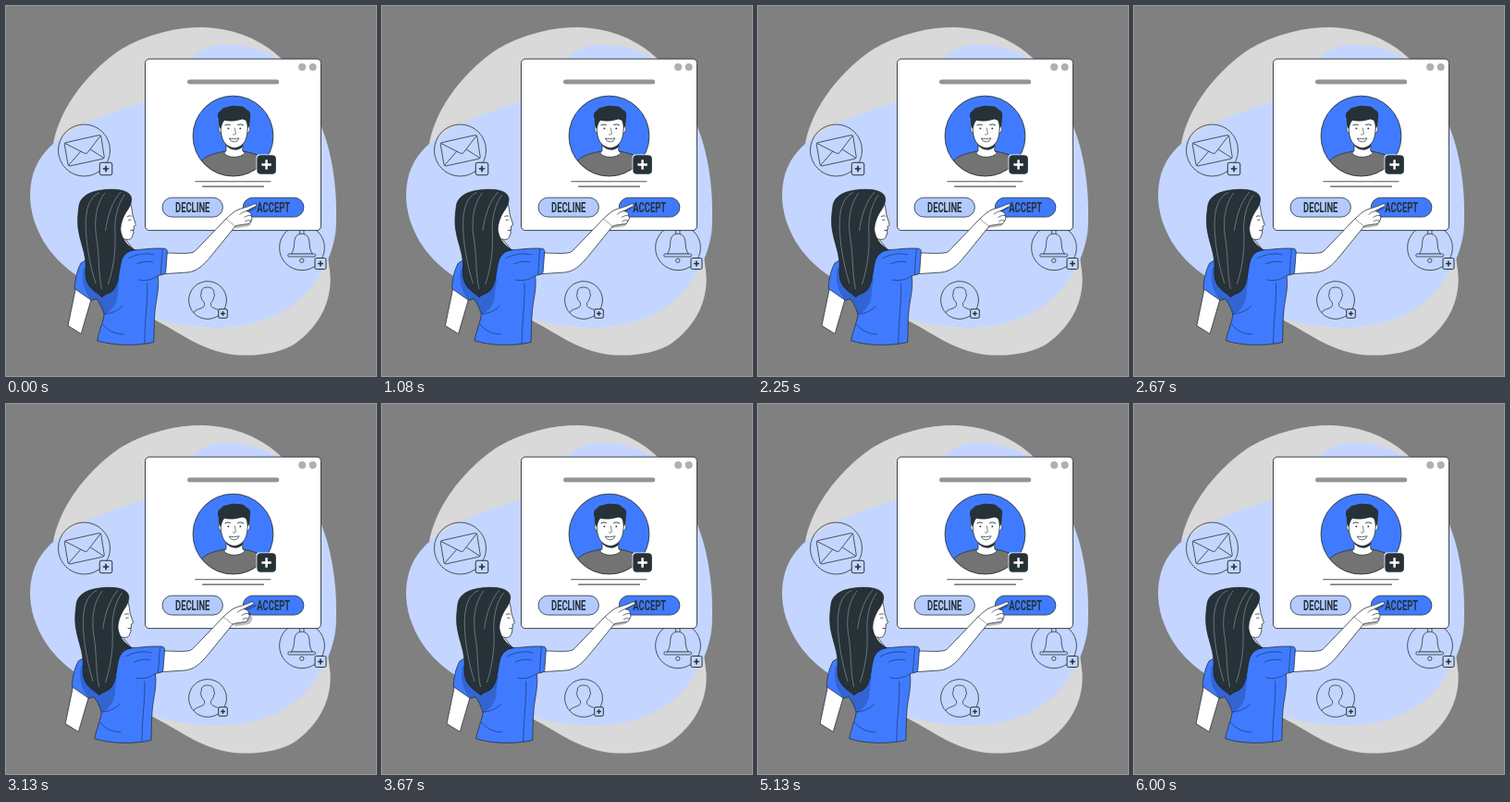
Write an HTML page with a canvas that moves like this. It is 400x400 px and loops after 6040 ms.

```html
<!DOCTYPE html>
<html lang="en">
<head>
<meta charset="utf-8">
<title>Friend request</title>
<style>
html, body { margin: 0; width: 100%; height: 100%; overflow: hidden; background: #808080; }
canvas { display: block; width: 400px; height: 400px; }
</style>
</head>
<body>
<canvas id="stage"></canvas>
<script>
const LOOP = 6040, STEPS = 145, SWING = 3.3;
const INK = '#263238', BLUE = '#407bff', PALE = '#c4d6ff', SHADE = '#3264d2';

const canvas = document.getElementById('stage');
const ctx = canvas.getContext('2d');
const dpr = window.devicePixelRatio || 1;
canvas.width = canvas.height = 400 * dpr;

function paint(path, fill, stroke, width = 0.8) {
  if (fill) { ctx.fillStyle = fill; ctx.fill(path); }
  if (stroke) { ctx.strokeStyle = stroke; ctx.lineWidth = width; ctx.stroke(path); }
}

function draw(d, fill, stroke, width) {
  paint(new Path2D(d), fill, stroke, width);
}

function circle(x, y, r, fill, stroke, width) {
  const p = new Path2D();
  p.arc(x, y, r, 0, Math.PI * 2);
  paint(p, fill, stroke, width);
  return p;
}

function box(x, y, w, h, r, fill, stroke, width) {
  const p = new Path2D();
  p.roundRect(x, y, w, h, r);
  paint(p, fill, stroke, width);
}

function badge(cx, cy, size, arm, fill, ink, weight) {
  box(cx - size / 2, cy - size / 2, size, size, size * 0.14, fill, INK, 1);
  draw(`M${cx - arm} ${cy}H${cx + arm}M${cx} ${cy - arm}V${cy + arm}`, null, ink, weight);
}

function label(text, x, y) {
  ctx.save();
  ctx.translate(x, y);
  ctx.scale(0.61, 1); // condensed face for all button labels
  ctx.font = '700 15.4px Roboto, "Liberation Sans", sans-serif';
  ctx.textAlign = 'center';
  ctx.fillStyle = INK;
  ctx.fillText(text, 0, 0);
  ctx.restore();
}

function background() {
  ctx.fillStyle = '#808080';
  ctx.fillRect(0, 0, 400, 400);
  draw('M50.5 152C56 116 82 76 124 47C153 30 184 23 212 23C248 24 277 37 299 58C322 80 330 120 334 170C338 215 347 258 350 286C354 316 340 345 314 364C297 376 270 379 246 377C213 373 189 354 164 341L90 300Z', '#d9d9d9');
  draw('M202 56C211 46 225 41 242 42C264 43 282 50 298 59C318 79 334 106 343 136C353 162 358 200 357 230C357 242 356 250 353 260C346 286 327 313 302 329C276 345 236 351 202 346C161 341 120 327 90 300C64 285 44 266 33.5 240C25 220 24 199 29.5 181C34 167 42 157 51 149C76 127 116 114 152 103C174 94 187 72 202 56Z', PALE);
}

function mail() {
  circle(84.5, 156, 28, null, INK);
  draw('M64.5 147.7L100.5 139.6Q102.4 139.2 102.8 141L106.2 162.8Q106.5 164.8 104.6 165.2L69.2 172.9Q67.4 173.2 67 171.3L63.3 149.8Q63 148 64.5 147.7Z', null, INK);
  draw('M63.6 148.4L85 159.3Q87 160 88.2 158.4L102.2 140.2M67.6 172.2L80.8 157.2M105.7 164.4L91.2 154.9', null, INK);
  badge(108, 176, 13.5, 3.2, PALE, INK, 1.7);
}

function user() {
  circle(218, 318, 20.4, null, INK);
  draw('M202.8 331.6C204.4 327.6 212.2 327.4 214.1 324.6C214.8 323.2 214.6 321.5 214.1 320.2C211.6 318.4 211 315.7 211 314.2C209.8 312.8 210.4 311.4 211.2 311.2C210.6 306.2 213.5 304 217.8 304C222.4 304 225.4 306.7 224.8 311.3C226.1 311.9 225.6 314.1 224.7 314.6C224.5 317.3 223.4 319.2 221.8 320.3C221.4 322 221.4 323.4 222 324.6C223.8 327.4 231.6 327.7 233.2 331.6', null, INK);
  badge(234.5, 332.5, 9.6, 2.4, PALE, INK, 1.4);
}

function bell() {
  circle(320, 261.3, 24.4, null, INK);
  draw('M308.2 268.2C311.4 264 311.4 259 311.7 255.5C312.2 248.8 315 246.4 319.7 246.2C324.4 246.4 327.6 249 328 255.5C328.2 260 328.6 264.5 331.4 268.2Z', null, INK);
  box(304.7, 268, 30, 3, 1.5, PALE, INK);
  draw('M317.6 246.4V242H322V246.4', null, INK);
  circle(319.8, 275.2, 2.2, null, INK);
  badge(340, 278.5, 12, 2.9, PALE, INK, 1.6);
}

function portrait() {
  const disc = circle(245.5, 140.6, 43.4, BLUE);
  ctx.save();
  ctx.clip(disc);
  draw('M210 170C213 163 222 160 237 157L257 157C272 160 280 164 283 173L282 190H208Z', '#737373', INK);
  draw('M238 147V156.5C237 158.2 236.3 158.4 235.5 158.7C239 164.8 254 165 258.6 158.5C256.8 158 256 157.5 255.8 156V146Z', '#fff', INK);
  ctx.restore();
  circle(245.5, 140.6, 43.4, null, INK, 0.9);
  draw('M238.2 148.5C241 153 251 155 255.8 147.5V152C251 157.5 243 156.5 238.2 151Z', INK);
  draw('M232.4 129.5C229 128.2 228.8 137.4 233.2 137.6ZM261 129.5C265 128 264.6 137 260.4 137.6Z', '#fff', INK);
  draw('M232 122C231.8 129 232 137.5 233.8 143C236 149.4 241.6 153.5 247 153.4C253 153.2 257.6 149 259.6 143C261.4 137.6 261.6 128 261.2 121Z', '#fff', INK);
  draw('M232.2 133C230.5 130.8 229.5 126 229.9 122.2C227.8 118.2 229.4 114 232.8 112.6C234.4 109.2 238.6 109.8 241 108.8C245 107 249 108 252 108.2C256 107.8 259 110 260.2 112C264.7 113.4 264.7 118.4 263.7 121.6C264 126 263 130.6 261.6 133C260.4 130.8 261 126.8 259.2 124C257.6 122.6 257 122.8 255.4 122.4C250 124 242 125.5 236.2 123.8C234 126 233.6 129.4 232.2 133Z', INK);
  draw('M236.5 129Q239.5 127.2 242.7 128.6M250.3 128.6Q254 127 257 129', null, INK, 0.9);
  circle(240.4, 132.4, 0.9, INK);
  circle(253.3, 132.4, 0.9, INK);
  draw('M247.3 131.5L248.4 138.4Q247 139.8 245.1 138.8', null, INK, 0.6);
  draw('M241.2 143Q246.5 144.6 252 142.8Q250.8 146.8 246.8 146.9Q242.6 146.8 241.2 143Z', '#fff', INK, 0.7);
  box(270.6, 160.5, 22, 22, 3.5, '#fff');
  badge(281.6, 171.5, 19.4, 5.2, INK, '#fff', 2.4);
}

const HAND = 'M238 230C243 225.5 247 221.2 253 219.4C258.5 218 264.5 215.7 268 214.1C270.7 213.2 271.5 215.4 269.5 216.7L259.7 221.7C263.3 222 265.5 224 265.1 226.4C266.5 228.7 266 231 264.7 232.1C264 235 261.3 236.4 258.5 235.8C254.5 237.2 251 236.4 248 238';

function panel() {
  box(150.5, 57.2, 190, 185.4, 4.5, '#fff', INK, 0.9);
  circle(320.2, 65.9, 4, '#b0b0b0');
  circle(331.7, 65.9, 4, '#b0b0b0');
  box(196, 79.4, 99.2, 5, 2.5, '#929698');
  portrait();
  draw('M204.3 189.7H286.4M212.2 195.1H279', null, '#4c565a', 1.1);
  box(169, 207.2, 65.4, 20.9, 10.4, '#b3caff', INK, 0.8);
  box(256.3, 207.2, 65.6, 20.9, 10.4, BLUE, INK, 0.8);
  ctx.save();
  ctx.globalAlpha = 0.26;
  ctx.translate(0.4, 2.6);
  draw(HAND, '#000');
  ctx.restore();
  label('DECLINE', 201.7, 223.2);
  label('ACCEPT', 289.2, 223.2);
}

function body() {
  // far arm
  draw('M76 302L67 345.6L81.2 354.4L93 314Z', '#fff', INK);
  // reaching arm and hand
  draw('M168 266.8C182 267 195 268.2 202 266.4C205 265 208 261 212 257L238 230L248 238L222 270C213 281 206 287 196 288L168 289.8Z', '#fff', INK);
  draw(HAND, '#fff');
  draw(HAND, null, INK);
  draw('M259.7 221.7C257 222.5 254 223.5 252.7 225.7M265.1 226.4C262 226.2 259 227.3 257.4 228.8M264.7 232.1C262 231.2 259.7 231.8 258.1 233', null, INK, 0.7);
  // shirt
  const shirt = new Path2D('M128 261C136 265.4 147 262.8 158 262.2C163 262 168 261.9 171 262.2C173.5 262.4 174.4 263.5 174.3 266L172.7 287.6Q172.5 289.7 170.2 290.1L164.2 291.6C166.2 304 162.3 317 161 330C160 342 160.2 352 159.7 363.5C141 367.8 116 367.4 98.6 361.8C100.5 351 105.7 340 106 333C104 326.8 101.5 321 97.8 316.6L92.4 318.2L74.2 305.6C74.4 297 76.5 286 81 278L94 270Z');
  paint(shirt, BLUE);
  ctx.save();
  ctx.clip(shirt);
  draw('M84 283C82 294 82 305 92 318L98 317C102 322 105 329 106 334C112 331 118 325 120 317C121 309 121 303 123 295L106 280Z', SHADE);
  ctx.restore();
  paint(shirt, null, INK);
  draw('M169.4 262.2C168.4 272 168 282 167.3 290.6M164.2 291.6C157 296.6 150 297.4 143 296M152.6 299.5C153.4 315 151 333 150.3 348L149.7 365.2M132 273C142 267.5 153 266.8 160 269M106 333C114 332.5 121 329.5 126 324M104.6 344C110 351 118 355 127 354.6M141 279C148 276 154 275.5 159 277', null, '#1b376f', 0.7);
}

function head() {
  // neck and face
  draw('M119 240L138 263.4C133 266 126 265 119 259Z', '#fff', INK);
  draw('M133 210C135.2 214 136.2 219.5 136.6 223.8C137 228 139.3 232.2 140.2 236C140.4 237.4 139 237.8 138.1 238L138.4 241L137.4 242.8L138 245.1C136.8 247.4 136.9 249 135.6 250.8C133.8 253.4 129 252.4 125.5 251.2L118 246V212Z', '#fff', INK);
  draw('M131 227.6Q133.6 226.2 135.7 227.2M132.2 231.7Q133.8 230.6 135.4 231.3M138.4 242Q136.4 243 134.4 242.4', null, INK, 0.8);
  // hair
  draw('M79 216C79.8 208.5 87 202.8 95 200.8C105 197.8 121 197.3 128.5 200.4C134.6 202.6 136.4 207 135.4 211.6C134.4 216.4 132.2 219.6 129.6 223.2C126.4 228.4 123.8 235.5 123.8 241.5C124.4 250 130 258.6 139.2 263.8C131 264.6 126.6 269.5 124.6 276C121.6 287 122.4 300 115.6 307.4C112 311 107 311 103.6 314.8C98.6 309.8 92 307 88.6 300C84.6 292.4 86.6 284 86 276C85 264.5 79.6 253 78 240C77 231 78 223 79 216Z', INK, '#161d20', 0.7);
  ctx.globalAlpha = 0.7;
  draw('M101 201.5C89 207 86 222 86.2 238C86.6 257 90.6 280 97 300M124 201C114.5 212 110 226 107.6 243M128.5 204C120.5 214 117.4 230 117.8 243C118.6 258 118 278 110.4 301M107 202C96.5 215 95 235 98 252C101 270 99.6 288 103.5 306', null, '#c9d0d3', 0.6);
  ctx.globalAlpha = 1;
}

// Side sway: five swings per loop that grow and then die down.
function sway(p) {
  return SWING * Math.sin(Math.PI * p) * Math.cos(10 * Math.PI * p);
}

function frame() {
  const t = performance.now() % LOOP;
  const step = Math.floor(t * STEPS / LOOP + 0.1) % STEPS;
  ctx.setTransform(dpr, 0, 0, dpr, 0, 0);
  ctx.lineJoin = 'round';
  background();
  mail();
  user();
  bell();
  panel();
  ctx.translate(sway(step / STEPS), 0);
  body();
  head();
  requestAnimationFrame(frame);
}
frame();
</script>
</body>
</html>
```
